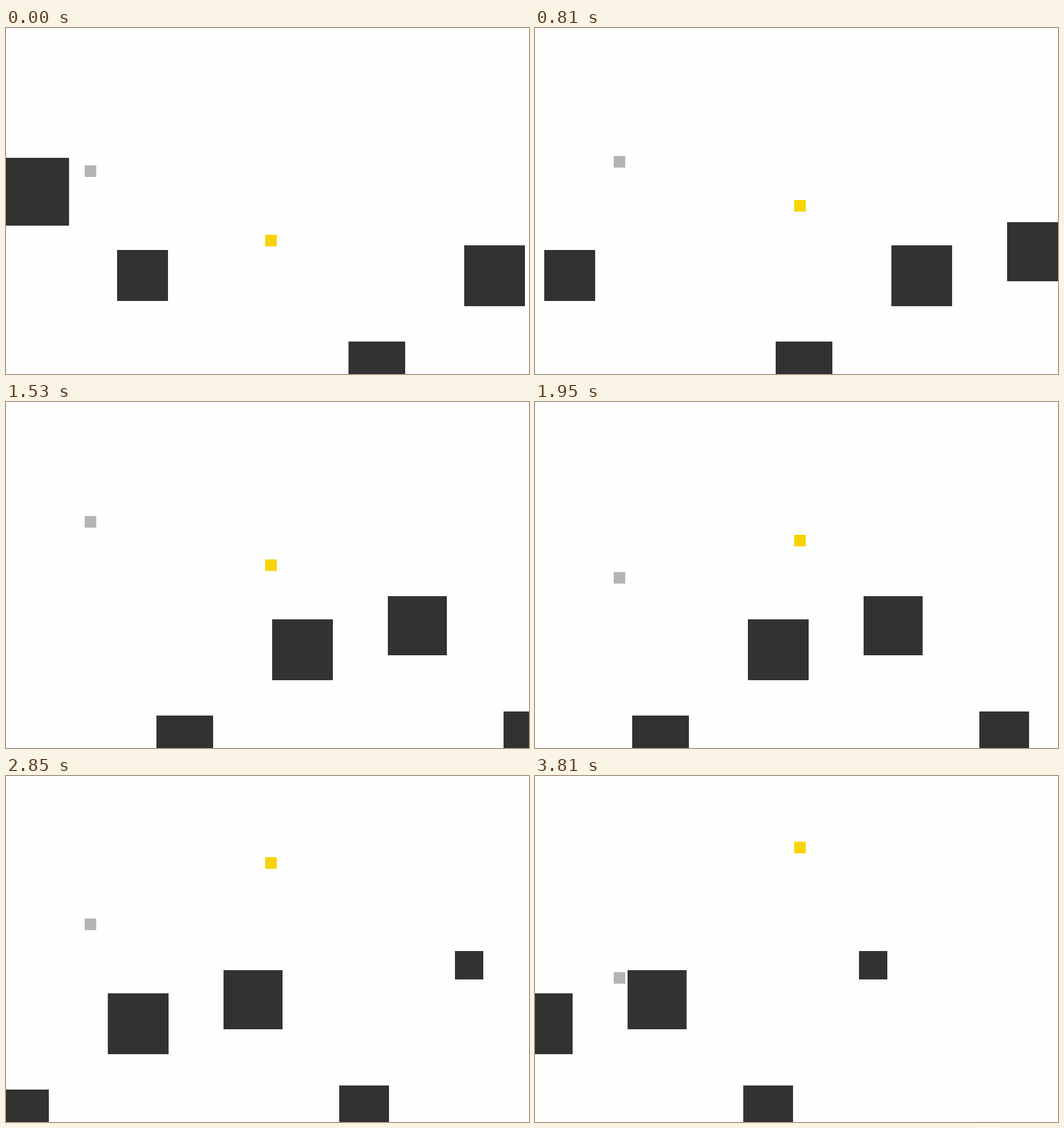
These frames come from a looping animation (904 px wide and 597 px high, 3.84 s). An HTML page with a canvas:

```html
<!DOCTYPE html>
<html lang="en">
<head>
<meta charset="utf-8">
<title>Hopping squares</title>
<style>
  html, body { margin: 0; width: 100%; height: 100%; overflow: hidden; background: #fefefe; }
  canvas { display: block; width: 100%; height: 100%; }
</style>
</head>
<body>
<canvas id="stage" width="904" height="597"></canvas>
<script>
const W = 904, H = 597;
const ctx = document.getElementById('stage').getContext('2d');
const LOOP = 3840, STEP = 30;
const SCROLL = 4, GAP = 200;         // pixels per tick, pixels between blocks
const GRAVITY = 0.8, LIFT = 8.8;     // per tick

// Square blocks from left to right: top, size. The third lies below the stage.
const BLOCKS = [
  [224, 117], [383, 88], [H, 0], [541, 98], [375, 105],
  [335, 102], [534, 86], [302, 49], [H - 0.05, 44]
];

// Each square jumps at the given ticks; gravity does the rest.
const HOPPERS = [
  { x: 136, top: 281.8, color: '#b4b5b3',
    jumps: [-14, 9.7, 25.5, 43.15, 64.6, 96, 119.6, 131.5, 149.3, 175.8, 202.4] },
  { x: 448, top: 351.4, color: '#f8d406',
    jumps: [0.6, 21, 40.8, 61, 80.8, 100, 119.85, 134.7, 150.2, 172.9, 192] }
];

// Game ticks elapsed; the pace quickens towards the end.
function tickAt(ms) {
  const turn = 3360, ticks = 181;
  return Math.ceil(ms < turn ? ms * ticks / turn : ticks + (ms - turn) * 3 / 50);
}

const flight = dt => dt * (GRAVITY / 2 * dt - LIFT);

function topAt({ top, jumps }, tick) {
  let i = 0;
  while (jumps[i + 1] <= tick) {
    top += flight(jumps[i + 1] - jumps[i]);
    i++;
  }
  return top + flight(tick - jumps[i]);
}

function draw(ms) {
  const tick = tickAt(ms);
  ctx.fillStyle = '#fefefe';
  ctx.fillRect(0, 0, W, H);
  ctx.fillStyle = '#323230';
  BLOCKS.forEach(([y, size], i) => ctx.fillRect(GAP * i - 8 - SCROLL * tick, y, size, size));
  for (const hopper of HOPPERS) {
    ctx.fillStyle = hopper.color;
    ctx.fillRect(hopper.x, topAt(hopper, tick), 20, 20);
  }
}

function frame() {
  draw(Math.floor(performance.now() % LOOP / STEP) * STEP);
  requestAnimationFrame(frame);
}
frame();
</script>
</body>
</html>
```
